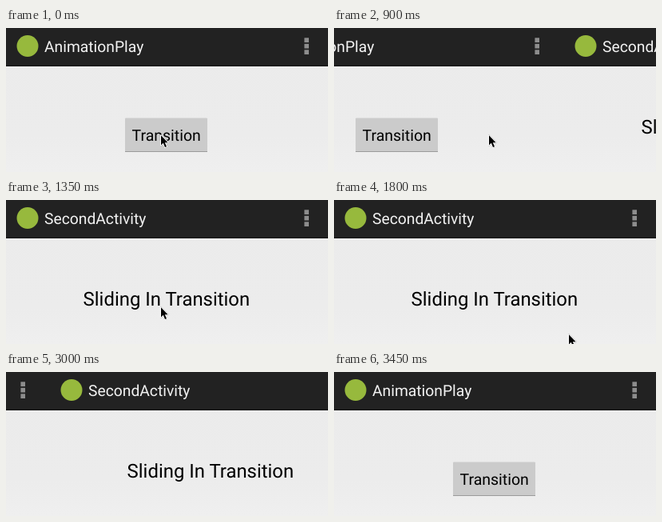
Write an HTML page that moves like this. It is 403x180 px and loops after 4.43 s.

```html
<!DOCTYPE html>
<html lang="en">
<head>
<meta charset="utf-8">
<title>Activity transition</title>
<style>
  html, body { margin: 0; width: 100%; height: 100%; overflow: hidden; background: #ebebeb; }
  svg { display: block; }
  text { font-family: Roboto, "Noto Sans", sans-serif; text-rendering: geometricPrecision; }
  .title { font-size: 19.3px; fill: #f3f3f3; }
  .label { font-size: 19.5px; text-anchor: middle; }
  .message { font-size: 23.9px; text-anchor: middle; }
  #cursor { filter: drop-shadow(0 .5px .6px #0008); }
</style>
</head>
<body>
<svg width="403" height="180" viewBox="0 0 403 180">
  <defs>
    <linearGradient id="paper" x1="0" y1="0" x2="0" y2="1">
      <stop offset="0" stop-color="#ebebeb"/>
      <stop offset=".75" stop-color="#ececec"/>
      <stop offset="1" stop-color="#efefef"/>
    </linearGradient>
    <g id="barItems">
      <circle cx="27" cy="22.5" r="13.5" fill="#97b93d"/>
      <g fill="#8d8d8d">
        <rect x="373.4" y="12.3" width="5.6" height="5.7"/>
        <rect x="373.4" y="19.8" width="5.6" height="5.7"/>
        <rect x="373.4" y="27.3" width="5.6" height="5.7"/>
      </g>
    </g>
  </defs>

  <rect width="403" height="180" fill="url(#paper)"/>
  <rect width="403" height="48" fill="#222"/>
  <rect y="46" width="403" height="2" fill="#1b1b1b"/>

  <g id="first">
    <use href="#barItems"/>
    <text class="title" x="48" y="30">AnimationPlay</text>
    <g id="idle">
      <rect x="149" y="112.5" width="103" height="42.5" rx="1" fill="#cbcbcb"/>
      <rect x="149" y="154" width="103" height="1" fill="#9b9b9b"/>
    </g>
    <g id="pressed">
      <rect x="145.5" y="108" width="111" height="51" rx="3" fill="#a0d5ec"/>
      <rect x="149" y="112.5" width="103" height="42.5" rx="1" fill="#41b8e5"/>
      <rect x="149" y="154" width="103" height="1" fill="#3394ba"/>
    </g>
    <text class="label" x="200.7" y="141">Transition</text>
  </g>

  <g id="second">
    <use href="#barItems"/>
    <text class="title" x="48" y="30">SecondActivity</text>
    <text class="message" x="200.9" y="132">Sliding In Transition</text>
  </g>

  <path id="cursor" d="M2 1.3V13.4L4.8 10.8L7 16L9 15.2L6.8 10.2H10.7Z"
        fill="#000" stroke="#fff" stroke-width="2" paint-order="stroke" stroke-linejoin="round"/>
</svg>

<script>
  const LOOP = 4430, STEP = 150, PAGE = 410, SLIDE = 500;
  const [first, second, idle, pressed, cursor] =
    ["first", "second", "idle", "pressed", "cursor"].map(id => document.getElementById(id));

  // [start time, x, y] of the pointer, which leaves at POINTER_END
  const POINTER = [[0, 192, 133], [1650, 266, 158], [1800, 292, 167], [1950, 288, 147], [2100, 261, 144]];
  const POINTER_END = 2250;

  const progress = (time, start) => Math.min(1, Math.max(0, (time - start) / SLIDE));
  const place = (node, x, y = 0) => node.setAttribute("transform", `translate(${x} ${y})`);
  const show = (node, visible) => node.setAttribute("visibility", visible ? "visible" : "hidden");

  function draw(now) {
    // The screen refreshes in fixed steps
    const time = Math.floor(now % LOOP / STEP) * STEP;

    const offset = Math.round(PAGE * (progress(time, 751) - progress(time, 2933)));
    place(first, -offset);
    place(second, PAGE - offset);

    const isPressed = time >= 600 && time < 750;
    show(pressed, isPressed);
    show(idle, !isPressed);

    const [, x, y] = POINTER.findLast(([start]) => time >= start);
    place(cursor, x, y);
    show(cursor, time < POINTER_END);
  }

  const origin = performance.now();
  function tick() {
    draw(performance.now() - origin);
    requestAnimationFrame(tick);
  }
  tick();
</script>
</body>
</html>
```
